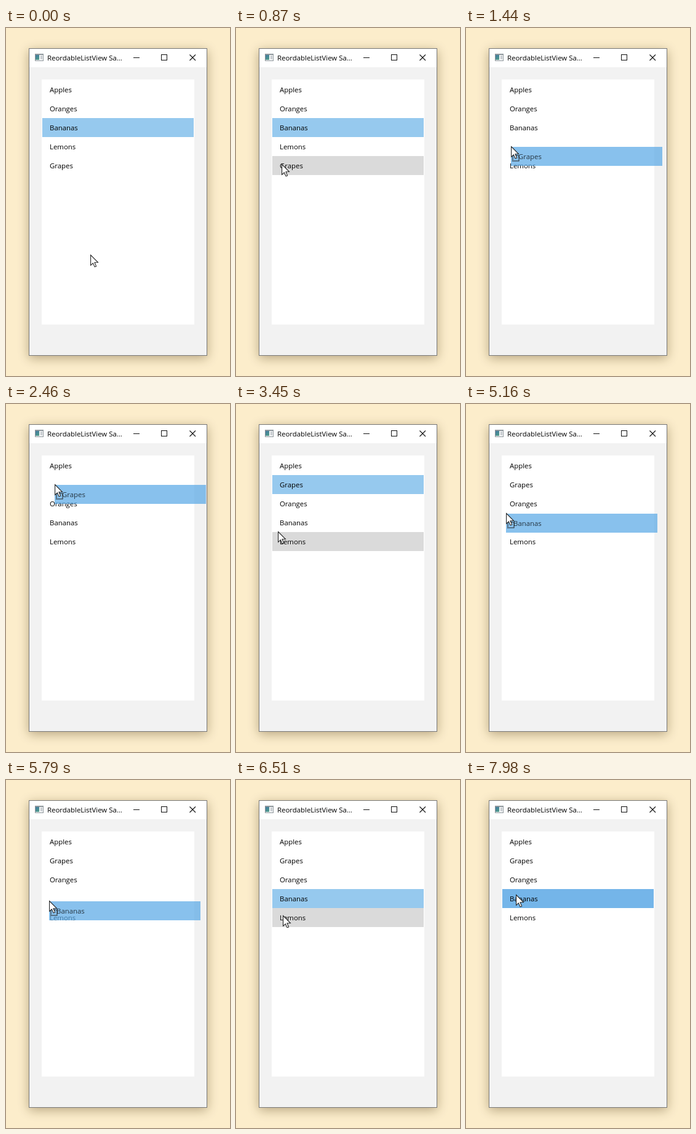
An HTML page with a canvas that plays this animation: 364x568 px, repeating every 8 s.

```html
<!DOCTYPE html>
<html lang="en">
<head>
<meta charset="utf-8">
<title>Reorderable list</title>
<style>
  html, body { margin: 0; width: 100%; height: 100%; overflow: hidden; background: #fcedcb; }
  canvas { display: block; width: 364px; height: 568px; }
</style>
</head>
<body>
<canvas id="stage"></canvas>
<script>
const W = 364, H = 568, LOOP = 8000, STEP = 30;
const ROW_X = 59, ROW_Y = 85, ROW_W = 246, ROW_H = 31;
const SELECTED = '#96c9ee', ACTIVE = '#74b5e9', HOVER = '#dadada', DRAGGED = '#5ba9e6';
const FONT = '11.4px "Open Sans", "Noto Sans", sans-serif';

// Places where the pointer turns or rests
const STOPS = [
  { t: 30, x: 138, y: 371 },
  { t: 870, x: 75, y: 223 },
  { t: 1440, x: 74, y: 194 },
  { t: 2700, x: 81, y: 126 },
  { t: 3450, x: 69, y: 209 },
  { t: 3720, x: 76, y: 195 },
  { t: 4290, x: 70, y: 116 },
  { t: 5160, x: 66, y: 179 },
  { t: 6510, x: 77, y: 222 },
  { t: 7350, x: 80, y: 229 },
  { t: 7980, x: 82, y: 188 }
];

// Each move presses an item, drags it, then drops it into a row
const MOVES = [
  { item: 'Grapes', press: 900, drag: 990, drop: 2820, row: 1 },
  { item: 'Bananas', press: 3690, drag: 3780, drop: 5880, row: 3 }
];

const canvas = document.getElementById('stage');
const ctx = canvas.getContext('2d');
const dpr = window.devicePixelRatio || 1;
canvas.width = W * dpr;
canvas.height = H * dpr;

function rect(x, y, w, h, color) {
  ctx.fillStyle = color;
  ctx.fillRect(x, y, w, h);
}

function label(text, x, y) {
  ctx.font = FONT;
  ctx.fillStyle = '#000';
  ctx.fillText(text, x, y);
}

const ease = u => u * u * (3 - 2 * u);

function pointer(t) {
  const next = STOPS.findIndex(s => s.t > t);
  const b = STOPS.at(next);
  const a = next > 0 ? STOPS[next - 1] : b;
  const u = a === b ? 0 : ease((t - a.t) / (b.t - a.t));
  return [Math.round(a.x + (b.x - a.x) * u), Math.round(a.y + (b.y - a.y) * u)];
}

function listState(t, row) {
  let items = ['Apples', 'Oranges', 'Bananas', 'Lemons', 'Grapes'];
  let selected = 'Bananas', dragged = null;
  for (const m of MOVES) {
    if (t < m.press) break;
    selected = m.item;
    if (t < m.drag) break;
    if (t < m.drop) dragged = m.item;
    items = items.filter(name => name !== m.item);
    items.splice(dragged ? row : m.row, 0, dragged ? null : m.item);
    if (dragged) break;
  }
  return { items, selected, dragged };
}

function strokeLines(lines, width) {
  ctx.strokeStyle = '#111';
  ctx.lineWidth = width;
  ctx.beginPath();
  for (const [x1, y1, x2, y2] of lines) {
    ctx.moveTo(x1, y1);
    ctx.lineTo(x2, y2);
  }
  ctx.stroke();
}

function drawIcon() {
  rect(47, 42, 14, 12, '#8f979c');
  rect(48, 44, 12, 9, '#f3f5f6');
  const tint = ctx.createLinearGradient(48, 44, 54, 53);
  tint.addColorStop(0, '#3f78a0');
  tint.addColorStop(1, '#57a488');
  rect(48, 44, 6, 8, tint);
  rect(56, 45, 3, 6, '#c9ced2');
}

function drawWindow() {
  rect(0, 0, W, H, '#fcedcb');
  ctx.save();
  ctx.shadowColor = 'rgba(70, 50, 10, 0.38)';
  ctx.shadowBlur = 17 * dpr;
  ctx.shadowOffsetY = 4 * dpr;
  rect(37, 33, 290, 502, '#777');
  ctx.restore();
  rect(38, 34, 288, 500, '#f2f2f2');
  rect(38, 34, 288, 30, '#fff');
  drawIcon();
  label('ReordableListView Sa...', 67, 53);
  strokeLines([[207, 48.5, 217, 48.5]], 1);
  ctx.strokeRect(252.5, 43.5, 9, 9);
  strokeLines([[298.5, 43.5, 308, 53], [308, 43.5, 298.5, 53]], 1.1);
  rect(58, 84, 248, 400, '#fff');
}

function drawRow(name, x, y, color) {
  if (color) rect(x, y, ROW_W, ROW_H, color);
  label(name, x + 12, y + 20);
}

// Dotted frame under the arrow while an item is carried
function drawDragMark(x, y) {
  for (let r = 0; r < 11; r++) {
    for (let c = 0; c < 12; c++) {
      const edge = r < 2 || r > 8 || c < 2 || c > 9;
      if (edge && (r + c) % 2 === 0) rect(x + c, y + r, 1, 1, '#222');
    }
  }
}

function drawPointer(x, y) {
  ctx.save();
  ctx.translate(x - 0.4, y - 0.4);
  ctx.scale(1.05, 1.05);
  ctx.beginPath();
  [[0, 0], [0, 16], [3.6, 12.6], [6.2, 18.4], [8.6, 17.4], [6.1, 11.6], [11.3, 11.4]]
    .forEach(p => ctx.lineTo(...p));
  ctx.closePath();
  ctx.fillStyle = '#fff';
  ctx.fill();
  ctx.strokeStyle = '#1c1c1c';
  ctx.lineWidth = 1;
  ctx.stroke();
  ctx.restore();
}

function draw(time) {
  const t = Math.floor((time % LOOP) / STEP) * STEP;
  const [x, y] = pointer(t);
  const row = Math.floor((y - ROW_Y) / ROW_H);
  const { items, selected, dragged } = listState(t, row);

  ctx.setTransform(dpr, 0, 0, dpr, 0, 0);
  drawWindow();
  items.forEach((name, i) => {
    if (!name) return;
    const hover = i === row && !dragged;
    const color = name === selected ? (hover ? ACTIVE : SELECTED) : hover ? HOVER : null;
    drawRow(name, ROW_X, ROW_Y + i * ROW_H, color);
  });
  if (dragged) {
    ctx.globalAlpha = 0.72;
    drawRow(dragged, x - 1, y, DRAGGED);
    ctx.globalAlpha = 1;
    drawDragMark(x + 1, y + 13);
  }
  drawPointer(x, y);
}

const start = performance.now();
function tick() {
  draw(performance.now() - start);
  requestAnimationFrame(tick);
}
tick();
</script>
</body>
</html>
```
